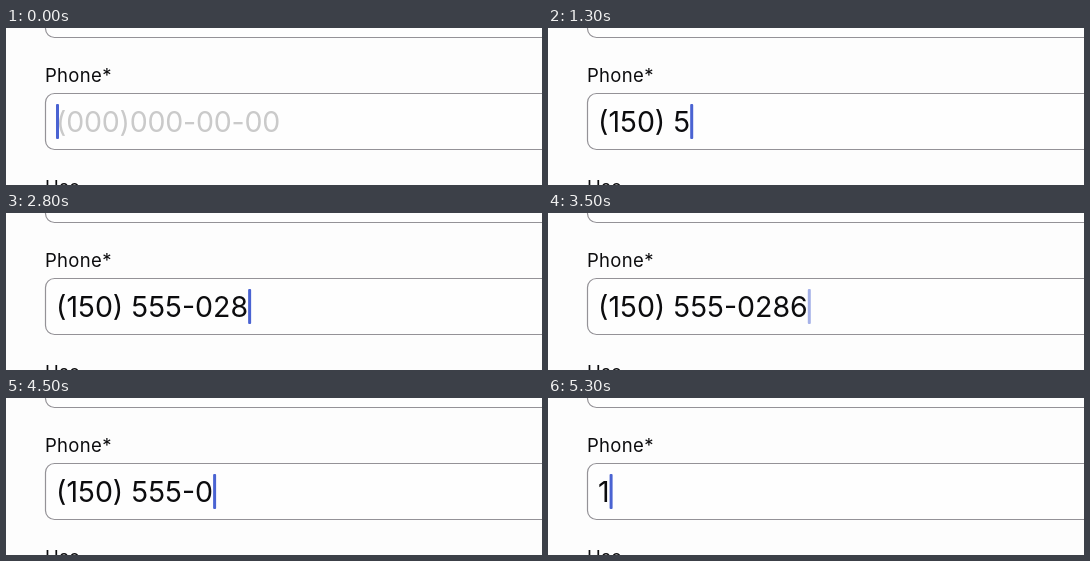
Write an HTML page that moves like this. It is 536 by 157 pixels and loops after 5400 ms.

```html
<!DOCTYPE html>
<html lang="en">
<head>
<meta charset="utf-8">
<style>
  html, body { margin: 0; height: 100%; overflow: hidden; background: #fdfdfd; }
  svg { display: block; font-family: Inter, Roboto, sans-serif; }
  .label { font-size: 18.5px; letter-spacing: .35px; fill: #0c0c0e; }
  .value { font-size: 28.5px; fill: #0c0c0e; }
  .value.empty { fill: #cacaca; letter-spacing: -.2px; }
  .field { fill: #fefefe; stroke: #949297; stroke-width: 1.2; }
</style>
</head>
<body>
<svg width="536" height="157" viewBox="0 0 536 157">
  <rect class="field" x="39.5" y="-46.5" width="540" height="56" rx="9"/>
  <text class="label" x="38.9" y="53.5">Phone*</text>
  <rect class="field" x="39.5" y="65.5" width="540" height="56" rx="9"/>
  <text class="value" id="value" x="50" y="104"></text>
  <rect id="caret" y="76" width="3" height="35" rx="1" fill="#4a63d2"/>
  <text class="label" x="38.9" y="165.5">Use</text>
</svg>
<script>
const LOOP = 5400;
const DIGITS = "1505550286";
const PLACEHOLDER = "(000)000-00-00";
const TYPED = [400, 700, 1000, 1300, 1500, 1800, 2000, 2200, 2400, 2900];
const DELETED = [4300, 4400, 4500, 4600, 4700, 4900, 5000, 5200, 5300];

const value = document.getElementById("value");
const caret = document.getElementById("caret");

const countBefore = (times, t) => times.filter(time => time <= t).length;
const ramp = (t, from, to) => Math.min(1, Math.max(0, (t - from) / (to - from)));

function format(d) {
  if (d.length < 4) return d;
  const text = `(${d.slice(0, 3)}) ${d.slice(3, 6)}`;
  return d.length > 6 ? `${text}-${d.slice(6)}` : text;
}

function draw(now) {
  const t = now % LOOP;
  const count = countBefore(TYPED, t) - countBefore(DELETED, t);
  const text = format(DIGITS.slice(0, count)) || PLACEHOLDER;

  if (value.textContent !== text) value.textContent = text;
  value.classList.toggle("empty", !count);
  caret.setAttribute("x", 50 + (count ? value.getComputedTextLength() : 0));

  // The caret blinks once while the complete number rests.
  caret.setAttribute("opacity", 1 - ramp(t, 3400, 3600) + ramp(t, 3950, 4150));
  requestAnimationFrame(draw);
}
requestAnimationFrame(draw);
</script>
</body>
</html>
```
